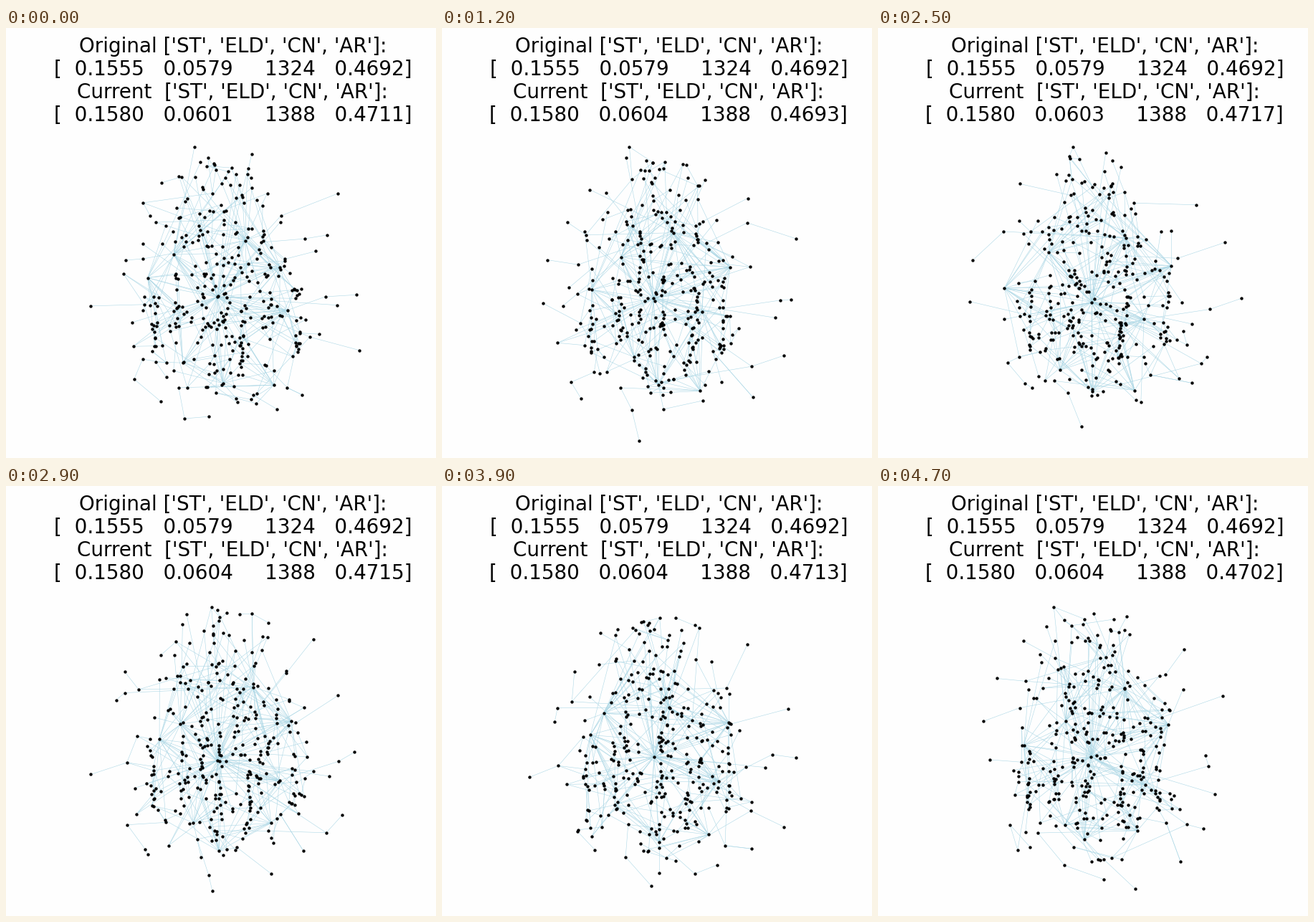
These frames come from a looping animation (600 by 600 pixels, 4.8 s). A matplotlib script:

```python
import numpy as np
import matplotlib.pyplot as plt
from matplotlib.animation import FuncAnimation
from matplotlib.collections import LineCollection

FRAMES, INTERVAL = 48, 100
CENTER = np.array([300, 370])

# Nodes with many links, the main one first.
HUBS = np.array([(295, 379), (384, 411), (249, 469), (343, 291), (236, 320),
                 (298, 500), (361, 495), (202, 366), (394, 324)], float)
N_HUBS, N_RIM, N_RUNS, RUN_LEN, N_BODY = len(HUBS), 15, 7, 12, 235


def make_rim(rng):
    """Outlying leaves on an ellipse, a little wider on the right."""
    angle = 2 * np.pi * (np.arange(N_RIM) + rng.uniform(-0.3, 0.3, N_RIM)) / N_RIM
    reach = rng.uniform(0.88, 1.0, N_RIM)
    radius_x = np.where(np.cos(angle) > 0, 200, 176)
    return CENTER + np.column_stack([radius_x * reach * np.cos(angle),
                                     192 * reach * np.sin(angle)])


def make_runs(rng):
    """Vertical strings of nodes that keep a common x."""
    xs = np.linspace(208, 396, N_RUNS)
    mids = rng.uniform(370, 465, N_RUNS)
    offsets = rng.uniform(-48, 48, (N_RUNS, RUN_LEN))
    return np.column_stack([np.repeat(xs, RUN_LEN), (mids[:, None] + offsets).ravel()])


def make_body(rng):
    """Pear-shaped cloud, densest along its vertical axis."""
    t = rng.beta(1.5, 1.5, N_BODY)
    half = 45 + 95 * np.sin(np.pi * t ** 1.35)
    x = 300 + half * rng.triangular(-1.2, 0, 1.2, N_BODY)
    return np.column_stack([x, 178 + 355 * t])


def link(pts, rng):
    """Index pairs: spokes to hubs, short local links, a few extras."""
    dist = np.linalg.norm(pts[:, None] - pts[None], axis=2)
    order = np.argsort(dist, axis=1)
    near_hubs = 1 + np.argsort(dist[:, 1:N_HUBS], axis=1)
    reach = np.linalg.norm(pts - CENTER, axis=1)
    first = N_HUBS + N_RIM
    pairs = [(0, h) for h in range(1, N_HUBS)]
    for i in range(N_HUBS, first):
        pairs.append((i, next(j for j in order[i, 1:] if reach[j] < reach[i])))
    for i in range(first, len(pts)):
        pick = rng.random()
        if pick < 0.17:
            j = 0
        elif pick < 0.55:
            j = rng.choice(near_hubs[i, :3])
        else:
            j = rng.choice(order[i, 1:16])
        pairs.append((i, j))
    for i in rng.integers(first, len(pts), 60):
        pairs.append((i, rng.choice(order[i, 1:80])))
    return np.array(pairs)


def jitter(step):
    """Move every node around its home; runs shift sideways as one."""
    rng = np.random.default_rng(step)
    shift_x = rng.normal(0, 8, N_RUNS).repeat(RUN_LEN) + rng.normal(0, 2.2, N_RUNS * RUN_LEN)
    shift_y = rng.normal(0, 12, N_RUNS * RUN_LEN)
    moves = np.vstack([
        rng.normal(0, 2.5, (1, 2)),
        rng.normal(0, 9, (N_HUBS - 1, 2)),
        rng.normal(0, 12, (N_RIM, 2)),
        np.column_stack([shift_x, shift_y]),
        rng.normal(0, 14, (N_BODY, 2)),
    ])
    return np.clip(home + moves, (111, 166), (515, 576))


def caption(step):
    eld = np.interp(step, [0, 1, 12, 15, 19, 23], [601, 604, 604, 603, 604, 603])
    ar = np.interp(step, [0, 1, 9, 12, 15, 19, 23],
                   [4711, 4702, 4713, 4693, 4707, 4715, 4717])
    names = "['ST', 'ELD', 'CN', 'AR']:"
    return (f"Original {names}\n[  0.1555   0.0579     1324   0.4692]\n"
            f"Current  {names}\n[  0.1580   0.{round(eld):04d}     1388   0.{round(ar):04d}]")


rng = np.random.default_rng(7)
home = np.vstack([HUBS, make_rim(rng), make_runs(rng), make_body(rng)])
pairs = link(home, rng)

plt.rcParams["font.family"] = "DejaVu Sans"
fig = plt.figure(figsize=(6, 6), dpi=100, facecolor="#fefefe")
ax = fig.add_axes([0, 0, 1, 1])
ax.set(xlim=(0, 600), ylim=(600, 0))
ax.axis("off")

edges = ax.add_collection(LineCollection([], colors="lightblue", linewidths=0.4, zorder=1))
nodes = ax.scatter([], [], s=10, c="black", linewidths=0, zorder=2)
title = ax.text(316.3, 130, "", fontsize=20, linespacing=1.18, ha="center", va="baseline")


def draw(frame):
    # The sequence plays forward, then back.
    step = min(frame, FRAMES - frame)
    pts = jitter(step)
    nodes.set_offsets(pts)
    edges.set_segments(pts[pairs])
    title.set_text(caption(step))
    return edges, nodes, title


anim = FuncAnimation(fig, draw, frames=FRAMES, interval=INTERVAL, repeat=True, repeat_delay=0)
plt.show()
```
